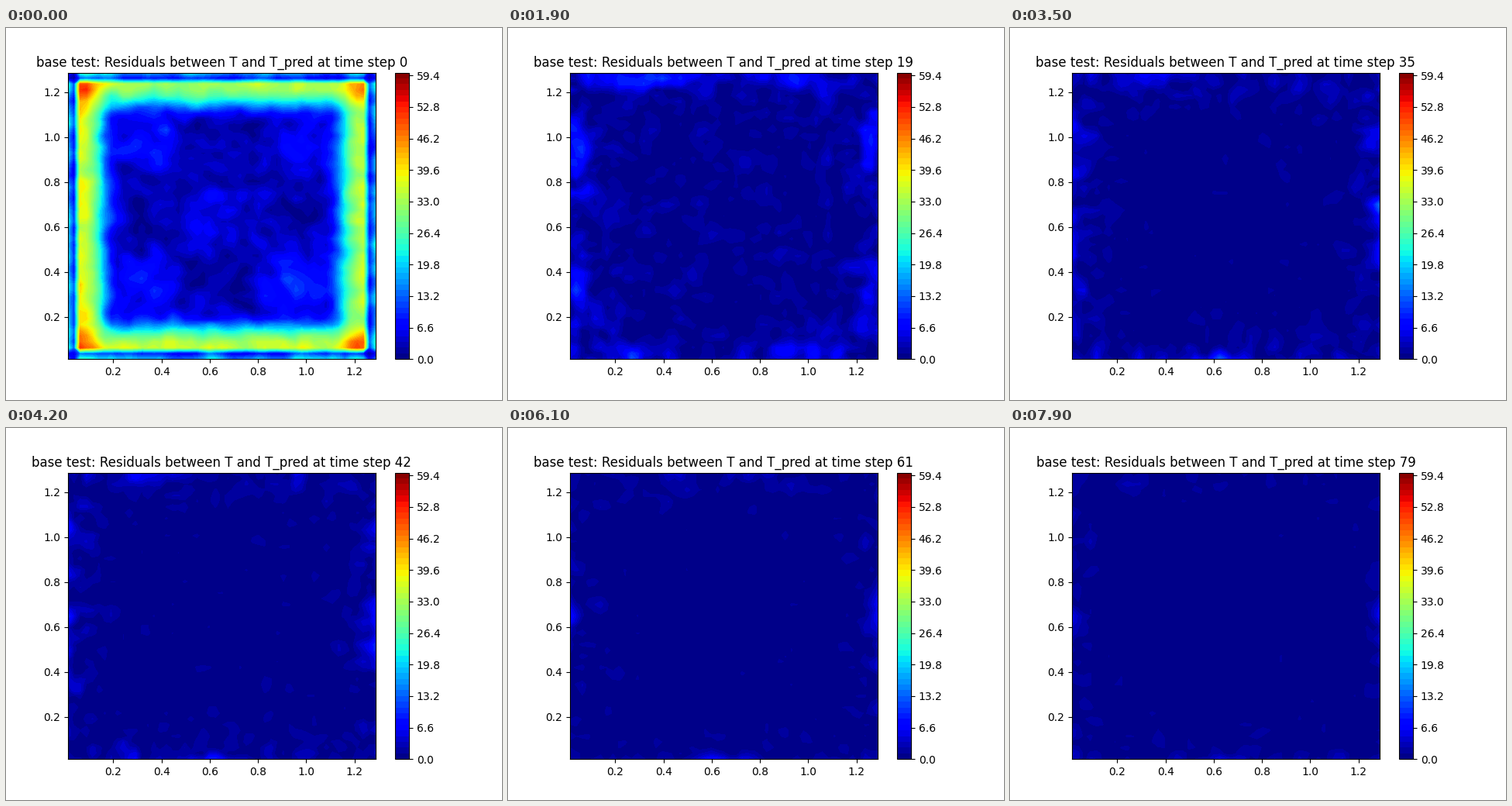
Animation of 640 by 480 pixels, one loop 8000 ms. Source, as a matplotlib script:

```python
import numpy as np
import matplotlib.pyplot as plt
from matplotlib.animation import FuncAnimation

STEPS, N = 80, 51
LEVELS = np.linspace(0, 60, 51)
CELL = 1.3 / N
pos = (np.arange(N) + 0.5) * CELL
X, Y = np.meshgrid(pos, pos)

# Distance to each wall, in cells
idx = np.arange(N)
left, bottom = np.meshgrid(idx, idx)
right, top = N - 1 - left, N - 1 - bottom
nearest = np.minimum.reduce([left, right, top, bottom])

KEYS = [0, 11, 19, 35, 50, 61, 79]
KNOT = 10


def bell(v, center, width):
    return np.exp(-((v - center) / width) ** 2)


def blob(cx, cy, width):
    return bell(X, cx, width) * bell(Y, cy, width)


def keyed(n, values):
    return np.interp(n, KEYS, values)


def make_noise(rng):
    """Unit-variance grain, softened over neighbouring cells."""
    raw = np.pad(rng.standard_normal((N, N)), 1, mode="reflect")
    for axis in (0, 1):
        raw = raw + 0.4 * (np.roll(raw, 1, axis) + np.roll(raw, -1, axis))
    grain = raw[1:-1, 1:-1]
    return grain / grain.std()


rng = np.random.default_rng(7)
fixed_grain = make_noise(rng)
knots = [make_noise(rng) for _ in range(STEPS // KNOT + 2)]


def noise(n):
    k, f = divmod(n / KNOT, 1)
    a = f * np.pi / 2
    moving = knots[int(k)] * np.cos(a) + knots[int(k) + 1] * np.sin(a)
    return 0.85 * moving + 0.53 * fixed_grain


def start_field():
    def band(d):
        return 1 / (1 + np.exp((d - 5.3) / 1.1))

    walls = np.sqrt((38 * band(left)) ** 2 + (34 * band(right)) ** 2
                    + (33 * band(top)) ** 2 + (36 * band(bottom)) ** 2)
    rim = np.interp(idx, [0, 1, 2], [0.45, 0.2, 1])
    rim = rim * rim[::-1]
    walls = walls * np.outer(rim, rim)
    walls += 6 * blob(0.088, 1.212, 0.03) + 3 * blob(1.21, 0.075, 0.03)
    inner = (1.6 + 7 * blob(0.36, 0.95, 0.13) + 6 * blob(0.97, 0.95, 0.13)
             + 7 * blob(0.35, 0.35, 0.14) + 8.5 * blob(0.95, 0.36, 0.14)
             + 4 * blob(0.65, 0.65, 0.17))
    return walls + inner


START = start_field()
PATCHES = (1.2 + 4 * (blob(0.18, 1.07, 0.07) + blob(1.11, 1.11, 0.08)
                      + blob(0.18, 0.21, 0.08) + blob(1.12, 0.18, 0.08))
           + 3 * blob(0.17, 0.66, 0.09) + 2.5 * blob(0.9, 0.4, 0.12)
           + 2 * blob(0.7, 0.67, 0.08) - 1.1 * blob(0.7, 0.92, 0.12))
LATE = (6 * bell(Y, 0.65, 0.2) * np.exp(-left)
        + 6 * bell(Y, 0.6, 0.2) * np.exp(-right)
        + 8 * bell(X, 0.62, 0.16) * np.exp(-bottom))


def side_layers(n):
    width = np.clip(1.3 + 0.08 * (n - 11), 1.3, 3)

    def layer(d):
        return bell(d, 1, width)

    pair = bell(Y, 0.32, 0.17) + bell(Y, 0.95, 0.17)
    return (layer(top) * (18 * bell(X, 0.32, 0.21) + 12 * bell(X, 0.93, 0.2))
            + 14 * pair * (layer(left) + layer(right))
            + 12 * layer(bottom) * (bell(X, 0.28, 0.12) + bell(X, 0.98, 0.14)))


def residual(n):
    side = keyed(n, [0, 1, 0.58, 0.22, 0.1, 0.05, 0.03])
    field = np.exp(-n / 3.7) * START
    field = field + side * side_layers(n) + side ** 2 * PATCHES
    field += keyed(n, [0, 0, 0.1, 1, 0.9, 0.75, 0.5]) * LATE
    field += 8 * bell(n, 50, 4) * blob(0.76, 1.287, 0.025)
    field += 7 * bell(n, 35, 4) * blob(1.287, 0.69, 0.025)
    sigma = keyed(n, [1.3, 1.25, 1.0, 0.55, 0.45, 0.42, 0.37])
    sigma = sigma + keyed(n, [1.0, 1.6, 1.6, 1.7, 1.3, 1.0, 0.9]) * np.exp(-nearest / 4)
    return np.minimum(np.abs(field + sigma * noise(n)), 59.9)


fig, ax = plt.subplots(figsize=(6.4, 4.8), dpi=100)


def draw_field(n):
    ax.set_title(f"base test: Residuals between T and T_pred at time step {n}")
    return ax.contourf(X, Y, residual(n), levels=LEVELS, cmap="jet")


contours = draw_field(0)
fig.colorbar(contours, ax=ax, ticks=np.arange(10) * 6.6, format="%.1f")


def update(n):
    global contours
    contours.remove()
    contours = draw_field(n)
    return []


anim = FuncAnimation(fig, update, frames=STEPS, interval=100,
                     repeat=True, repeat_delay=0, blit=False)
plt.show()
```
